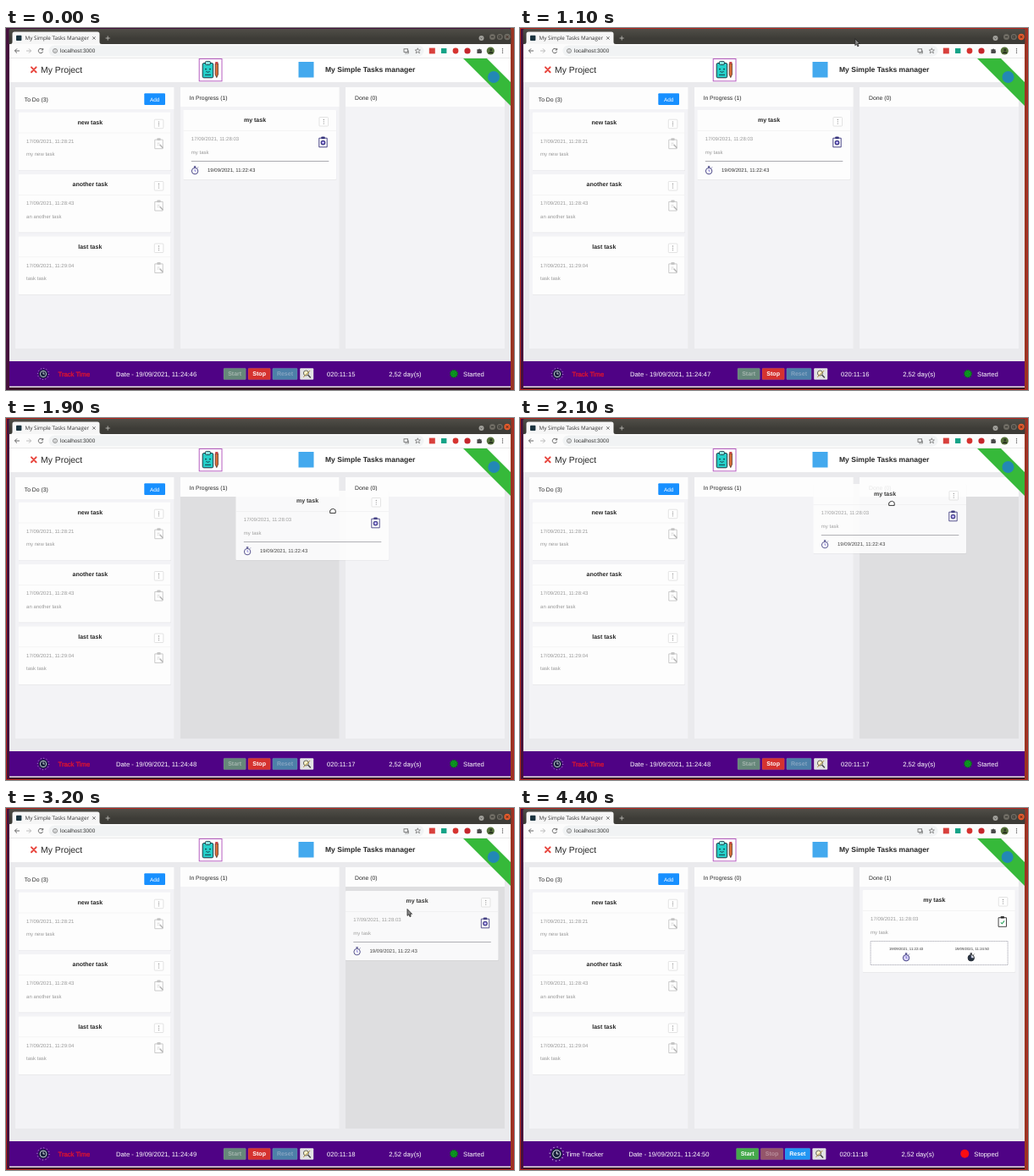
Recreate the animation shown at these times as an HTML page. Size 600 by 428 pixels, loop 4.5 s.

```html
<!DOCTYPE html>
<html lang="en">
<head>
<meta charset="utf-8">
<title>Tasks board</title>
<style>
  html, body { margin: 0; width: 100%; height: 100%; overflow: hidden; background: #3b3a36; }
  svg { display: block; width: 100%; height: 100%; }
  text { font-family: "Liberation Sans", Arial, sans-serif; white-space: pre; text-rendering: geometricPrecision; }
  .tab { font-family: "Open Sans", "Noto Sans", sans-serif; }
  .b { font-weight: bold; }
  .m { text-anchor: middle; }
</style>
</head>
<body>
<svg id="stage" viewBox="0 0 600 428" preserveAspectRatio="none"></svg>
<script>
const LOOP = 4500, STEP = 100, LIFT = 1700, DROP = 3400;
const NAVY = '#35327a', INK = '#262626', GREY = '#999';

const rect = (x, y, w, h, fill, more = '') =>
  `<rect x="${x}" y="${y}" width="${w}" height="${h}" fill="${fill}" ${more}/>`;
const circle = (x, y, r, fill, more = '') =>
  `<circle cx="${x}" cy="${y}" r="${r}" fill="${fill}" ${more}/>`;
const line = (d, color, width = 1, fill = 'none', more = '') =>
  `<path d="${d}" stroke="${color}" stroke-width="${width}" fill="${fill}" ${more}/>`;
const text = (x, y, s, size, fill, cls = '', more = '') =>
  `<text x="${x}" y="${y}" font-size="${size}" fill="${fill}" class="${cls}" ${more}>${s}</text>`;
const group = (x, y, body, id = '') =>
  `<g ${id && `id="${id}"`} transform="translate(${x} ${y})">${body}</g>`;

// Icons are drawn around their own centre.
const board = (color, mark) =>
  line('M-4.7-4.6H4.7V6H-4.7Z', color, .9, '#fff') +
  rect(-2.2, -6.4, 4.4, 2.6, color, 'rx=".8"') + mark;
const pencilMark = line('M-2-.5H1M-2 1.5H0', '#c4c4c4', .7) + line('M1 1L4.8 5', '#b5b5b5', 1.5);
const gearMark = circle(0, .8, 2.3, '#8c7ae6', `stroke="${NAVY}" stroke-width="1.1"`) + circle(0, .8, .8, '#fff');
const checkMark = line('M-2 1L-.4 2.5L2.3-1', '#27a35a', 1.1);
const watch = (color, face) =>
  circle(0, .8, 3.7, face, `stroke="${color}" stroke-width=".9"`) +
  rect(-1.2, -5, 2.4, 1.3, color) + line('M0-4V-3M2.8-2.8L3.8-3.8', color, .8) +
  line('M0 .9V-1.3M0 .9H1.3', '#6b5bd0', .8);
const menu = (x, y) =>
  rect(x, y, 10.5, 10.5, '#fff', 'stroke="#dcdcdc" stroke-width=".8" rx=".8"') +
  [2.9, 5.2, 7.5].map(d => circle(x + 5.25, y + d, .55, '#777')).join('');

function cardTop(w, h, title, date, note) {
  return rect(.3, .8, w, h, '#000', 'opacity=".05"') + rect(0, 0, w, h, '#fdfdfd', 'rx="1"') +
    text(84.5, 14.1, title, 7, INK, 'b m') + rect(0, 24, w, .6, '#efefef') + menu(160.5, 8.5) +
    text(9.3, 36, date, 6, GREY) + text(9.3, 51.8, note, 6, GREY);
}

const todoCard = (y, title, date, note) => group(14.8, y,
  cardTop(179.7, 68.5, title, date, note) + group(165.7, 37, board('#c4c4c4', pencilMark)));

const START = '19/09/2021, 11:22:43';
const MY_TASK = ['my task', '17/09/2021, 11:28:03', 'my task'];

const activeCard = group(209.5, 97,
  cardTop(180.5, 82, ...MY_TASK) + group(165, 37.8, board(NAVY, gearMark)) +
  rect(9.3, 60.2, 162.5, .8, '#97979e') + group(13.6, 71.3, watch(NAVY, '#fff')) +
  text(28.5, 73.1, START, 6, '#333'), 'active');

const doneCard = group(404.8, 97,
  cardTop(180, 97, ...MY_TASK) + group(165, 37.3, board('#333', checkMark)) +
  rect(9.3, 60.5, 162, 28, '#fefefe', 'stroke="#aaaab4" stroke-width=".8" stroke-dasharray="1.5 .5"') +
  text(51.3, 70.5, START, 4.3, '#333', 'm') +
  text(129, 70.5, '19/09/2021, 11:24:50', 4.3, '#333', 'm') +
  group(51.3, 79.4, watch(NAVY, '#d8d4f6')) +
  group(128, 79.4, watch('#17181f', '#dfe6ea') + line('M0 .8L0-2.9A3.7 3.7 0 1 0 3.7 .8Z', 'none', 0, '#28323f')),
  'done');

function column(x, w, headH, body, id) {
  return rect(x, 70, w, 309, '#f3f3f6', `id="${id}"`) + rect(x, 70, w, headH, '#fdfdfd') + body;
}

function browser() {
  const controls = circle(561.5, 12, 3, '#a3a29d') + line('M560.3 11.5L561.5 12.7L562.7 11.5', '#3b3a36', .8) +
    circle(574.5, 10.5, 3.5, '#6d6a62') + line('M573 10.5H576', '#2e2d29', .9) +
    circle(583.3, 10.5, 3.5, '#6d6a62') + rect(582, 9.2, 2.6, 2.6, 'none', 'stroke="#2e2d29" stroke-width=".8"') +
    circle(592, 10.5, 3.7, '#e35a2c', 'id="close"') + line('M590.6 9.1L593.4 11.9M593.4 9.1L590.6 11.9', '#3a2018', .9);
  const nav = line('M16 27H10.5M13 24.4L10.4 27L13 29.6', '#555', .9) +
    line('M24 27H29.5M27 24.4L29.6 27L27 29.6', '#b5b5b5', .9) +
    line('M43.2 25.4A2.7 2.7 0 1 0 43.6 27.8M43.7 24V26H41.7', '#555', .9);
  const address = rect(50.5, 20.6, 443, 12.8, '#f1f3f4', 'rx="6.4"') +
    circle(58, 27, 2.5, 'none', 'stroke="#666" stroke-width=".7"') + line('M58 26.6V28.4M58 25.4V26', '#666', .7) +
    text(64, 29.3, 'localhost:3000', 6.4, '#333') +
    rect(470, 24.8, 4.6, 3.6, 'none', 'stroke="#666" stroke-width=".8"') + line('M471 30H475.5V26.5', '#777', .7) +
    line('M486.3 23.8L487.2 26H489.4L487.7 27.5L488.4 29.8L486.3 28.4L484.2 29.8L484.9 27.5L483.2 26H485.4Z', '#666', .7);
  const extras = rect(499.8, 23.6, 7, 6.8, '#d8403c') + rect(514, 24, 6.4, 6, '#15a387') +
    circle(531, 27, 3.4, '#d6332f') + circle(545, 27, 3.6, '#c5262c') +
    line('M556.4 25.3H558A1.2 1.2 0 0 1 560.2 25.3H561.6V27A1.1 1.1 0 0 1 561.6 29V30H556.4Z', 'none', 0, '#4a4a4a') +
    circle(572.3, 27, 4.6, '#55713b') + circle(572.8, 25.9, 1.4, '#2b3423') +
    line('M569.8 30A3 3 0 0 1 575.6 30Z', 'none', 0, '#2b3423') +
    [24.7, 27, 29.3].map(y => circle(586.5, y, .7, '#555')).join('');
  return rect(0, 0, 600, 428, '#45103c') + rect(596, 0, 4, 428, '#9a3523') + rect(4, 425, 592, 3, '#3a1028') +
    '<linearGradient id="bar" x2="0" y2="1"><stop stop-color="#504e48"/><stop offset=".6" stop-color="#3d3c37"/></linearGradient>' +
    rect(3.5, 1, 593, 19, 'url(#bar)', 'rx="2"') +
    line('M5 19Q7.5 19 7.5 16.5V7Q7.5 4.5 10 4.5H108Q110.5 4.5 110.5 7V16.5Q110.5 19 113 19Z', 'none', 0, '#f6f6f6') +
    rect(12, 8.7, 6.4, 6.4, '#1b3440', 'rx=".8"') +
    text(22.5, 14.3, 'My Simple Tasks Manager', 6.3, '#333', 'tab') +
    line('M102.2 10.2L105.6 13.6M105.6 10.2L102.2 13.6', '#555', .8) +
    line('M117.6 12H122.8M120.2 9.4V14.6', '#c4c3be', .8) + controls +
    rect(4, 19, 592, 17, '#fcfcfc') + nav + address + extras + rect(4, 35.2, 592, .7, '#e0e0e0');
}

function pageHeader() {
  const logo = rect(228.2, 36.5, 26.8, 26.3, '#fff', 'stroke="#b65cc0" stroke-width="1"') +
    rect(232.2, 41.5, 12.5, 17.3, '#25cfc9', 'stroke="#15343f" stroke-width="1" rx="1.5"') +
    rect(235.4, 39.4, 6, 4, '#8fe9e4', 'stroke="#15343f" stroke-width=".9" rx="1.2"') +
    circle(236, 48.6, .9, '#15343f') + circle(241, 48.6, .9, '#15343f') +
    line('M236.4 51.4Q238.5 53.2 240.6 51.4M235 55.4H242', '#15343f', .9) +
    line('M247.2 42H250.4V55L248.8 58.6L247.2 55Z', '#4b2a1c', .8, '#e0713a') + rect(247.2, 40, 3.2, 2.4, '#c9484e');
  return rect(4, 36, 592, 28, '#fff') + rect(4, 64, 592, 330, '#eaeaed') +
    line('M30 46.4L35.6 52.2M35.6 46.4L30 52.2', '#e8473f', 2, 'none', 'stroke-linecap="round"') +
    text(41, 52.6, 'My Project', 10.4, INK) + logo +
    rect(345.5, 40, 18, 18.5, '#43a9ee') + text(377, 52, 'My Simple Tasks manager', 8.56, INK, 'b');
}

const ribbon = line('M540 36H568L596 64V92Z', 'none', 0, '#36b93a') + circle(576, 58, 7, '#2388b5', 'id="badge"');

function columns() {
  const todo = text(21.8, 87, 'To Do (3)', 6.8, INK) + rect(163.3, 77.3, 24.7, 13.8, '#1890ff', 'rx="1"') +
    text(175.7, 86.6, 'Add', 6.4, '#fff', 'm') +
    todoCard(99.7, 'new task', '17/09/2021, 11:28:21', 'my new task') +
    todoCard(173, 'another task', '17/09/2021, 11:28:43', 'an another task') +
    todoCard(246.5, 'last task', '17/09/2021, 11:29:04', 'task task');
  return column(11, 187.3, 26, todo, 'colTodo') +
    column(206, 187.5, 23, text(216.5, 85, '', 6.8, INK, '', 'id="progressHead"'), 'colProgress') +
    column(401, 188, 23, text(412, 85, '', 6.8, INK, '', 'id="doneHead"'), 'colDone') + doneCard + activeCard;
}

function button(x, w, label, fill, color) {
  return rect(x, 402.2, w, 13.6, fill, 'rx="1" stroke="#fff" stroke-opacity=".15" stroke-width=".7"') +
    text(x + w / 2, 411.4, label, 7, color, 'b m');
}

function toolButton(x) {
  return rect(x, 402.2, 16, 13.6, '#e2e2e4', 'rx="1"') +
    group(x + 8, 409, circle(-.8, -1, 3, '#f7f1c8', 'stroke="#555" stroke-width=".9"') +
      line('M1.5 1.2L4.6 4.4', '#444', 1.5) + line('M-4 4L4-4', '#a98a3a', 1));
}

function footer() {
  const clock = circle(0, 0, 8.2, 'none', 'stroke="#cfc6e6" stroke-width="1.1" stroke-dasharray="1.2 3.1"') +
    circle(0, 0, 6.6, '#17203c') + circle(0, 0, 4.5, 'none', 'stroke="#e4e8f4" stroke-width="1"') +
    line('M0-2.9V0H2.2', '#fff', .9);
  const running = text(61.5, 411.6, 'Track Time', 7.7, '#cf1238', '', 'stroke="#cf1238" stroke-width=".45"') +
    button(257, 26.3, 'Start', '#66877a', '#a4b5ae') + button(286, 26.3, 'Stop', '#d5322f', '#fff') +
    button(314.8, 29.3, 'Reset', '#4d80a8', '#86a5c2') + toolButton(347.2) +
    circle(529, 408.8, 4.2, '#0c9b20') +
    circle(529, 408.8, 4.2, 'none', 'stroke="#0b6a1c" stroke-width="1.7" stroke-dasharray="1.3 1.34"') +
    circle(529, 408.8, 1.9, 'none', 'stroke="#0b6a1c" stroke-width=".8" stroke-dasharray="1 1"') +
    text(540, 411.6, 'Started', 7.7, '#fff');
  const stopped = text(54, 411.6, 'Time Tracker', 7.7, '#fff') +
    button(255.5, 26.3, 'Start', '#45a94b', '#fff') + button(284.3, 26.5, 'Stop', '#94566a', '#b98e9c') +
    button(313, 29.7, 'Reset', '#2196f3', '#fff') + toolButton(345.4) +
    circle(525.3, 408.8, 5, '#fb0d12') + text(536.3, 411.6, 'Stopped', 7.7, '#fff');
  return rect(4, 394, 592, 29.6, '#4f0285') + rect(4, 423.6, 592, 1.4, '#f4f0f6') +
    group(44, 409, clock, 'clock') + `<g id="running">${running}</g><g id="stopped">${stopped}</g>` +
    group(0, 0, text(130, 411.6, '', 7.7, '#fff', '', 'id="date"') +
      text(379, 411.6, '', 7.65, '#fff', '', 'id="timer"') + text(452.2, 411.6, '2,52 day(s)', 7.7, '#fff'), 'numbers');
}

const hand = line('M-3.3 2.4V-.2Q-3.4-1.5-2-1.3Q-1.7-3-.3-2.4Q1-3.2 1.7-2Q3.3-2 3.2-.2V2.4Z', '#222', .9, '#fff');
const arrow = line('M-2-4.5V3.4L-.2 1.8L1 4.6L2.3 4L1 1.3H3.5Z', '#222', .8, '#8a8a8a');
const frameLine = rect(.5, .5, 599, 427, 'none', 'id="edge" stroke="#b3261f" stroke-width="1"');

const stage = document.getElementById('stage');
stage.innerHTML = browser() + pageHeader() + columns() + ribbon + footer() + frameLine +
  group(0, 0, `<g id="hand">${hand}</g><g id="arrow">${arrow}</g>`, 'cursor');

const el = {};
stage.querySelectorAll('[id]').forEach(node => el[node.id] = node);

// Rows of time, x, y; straight between rows.
const cardPath = [[LIFT, 0, 0], [1900, 62, -11], [2100, 137, -19], [2400, 171, -15], [2700, 186, -10],
  [3000, 187, -3], [3200, 191.5, 1], [DROP, 195.3, 0]];
const cursorPath = [[1000, 412, -8], [1500, 341, 118], [1700, 341, 120], [1900, 386, 110], [2100, 439, 101],
  [2400, 463, 104], [2700, 472, 109], [3000, 476, 120], [3200, 476, 124], [3600, 478, 124], [4200, 540, -8]];

function along(path, t) {
  const next = path.findIndex(p => p[0] > t);
  if (next < 0) return path[path.length - 1].slice(1);
  if (next === 0) return path[0].slice(1);
  const a = path[next - 1], b = path[next], k = (t - a[0]) / (b[0] - a[0]);
  return [a[1] + (b[1] - a[1]) * k, a[2] + (b[2] - a[2]) * k];
}

const show = (node, on) => node.setAttribute('display', on ? 'inline' : 'none');
const move = (node, x, y, more = '') => node.setAttribute('transform', `translate(${x} ${y}) ${more}`);

function draw(t) {
  const over = t >= DROP, focused = t >= 100;
  const ticks = Math.floor((t + 100) / 1000);
  el.date.textContent = `Date - 19/09/2021, 11:24:${46 + ticks}`;
  el.timer.textContent = `020:11:${Math.min(15 + ticks, 18)}`;
  el.progressHead.textContent = `In Progress (${over ? 0 : 1})`;
  el.doneHead.textContent = `Done (${over ? 1 : 0})`;
  el.colProgress.setAttribute('fill', t > LIFT && t < 2000 ? '#dedee0' : '#f3f3f6');
  el.colDone.setAttribute('fill', t >= 2000 && !over ? '#dedee0' : '#f3f3f6');

  const [cx, cy] = along(cardPath, t);
  move(el.active, 209.5 + cx, 97 + cy);
  el.active.setAttribute('opacity', t > LIFT ? .9 : 1);
  show(el.active, !over);
  show(el.done, over);
  show(el.running, !over);
  show(el.stopped, over);
  move(el.numbers, over ? -1.6 : 0, 0);

  const pulse = over ? 1 : .9 - .1 * Math.cos(t * Math.PI / 500);
  move(el.clock, over ? 43.3 : 44, 409, `scale(${pulse})`);
  move(el.badge, .5 * Math.sin(t * Math.PI / 450), 0);

  const held = t >= 1600 && t < 3100;
  move(el.cursor, ...along(cursorPath, t));
  show(el.cursor, t > 1000 && t < 4200);
  show(el.hand, held);
  show(el.arrow, !held);
  show(el.edge, focused);
  el.close.setAttribute('fill', focused ? '#e35a2c' : '#6d6a62');
}

const origin = performance.now();
function tick() {
  const t = Math.max(0, performance.now() - origin) % LOOP;
  draw(Math.floor(t / STEP) * STEP);
  requestAnimationFrame(tick);
}
tick();
</script>
</body>
</html>
```
